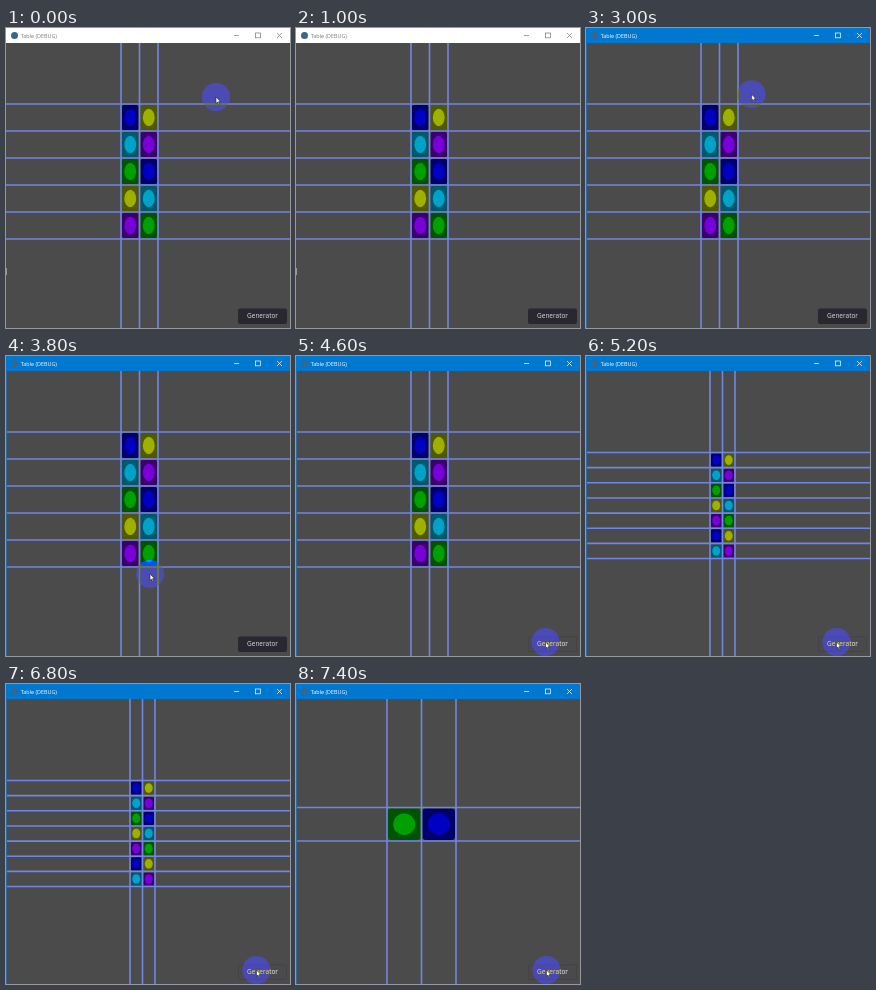
Write an HTML page with a canvas that moves like this. It is 284x300 px and loops after 8 s.

```html
<!DOCTYPE html>
<html lang="en">
<head>
<meta charset="utf-8">
<title>Table</title>
<style>
  html, body { margin: 0; width: 100%; height: 100%; overflow: hidden; background: #4b4b4b; }
  canvas { display: block; width: 100vw; height: 100vh; }
</style>
</head>
<body>
<canvas></canvas>
<script>
const WIDTH = 284, HEIGHT = 300, LOOP = 8000, STEP = 200;
const canvas = document.querySelector('canvas');
const ctx = canvas.getContext('2d');

// Tile colours in dealing order: background, disc
const PALETTE = [
  ['#000068', '#0000c4'],
  ['#505800', '#a0b000'],
  ['#00586c', '#00a2c8'],
  ['#3a006c', '#7800d8'],
  ['#005400', '#00a000'],
];

const GRIDS = [
  { from: 0, x: 115, y: 76, w: 18.5, h: 27, rows: 5, first: 0 },
  { from: 5200, x: 124, y: 96.5, w: 12.5, h: 15.15, rows: 7, first: 0 },
  { from: 7000, x: 91, y: 123.5, w: 34.5, h: 33.5, rows: 1, first: 4 },
];

// Pointer path: time, x, y
const PATH = [
  [0, 210, 69], [1000, 196, -30], [2000, 180, -30], [2400, 173, 13], [2600, 173, 13],
  [3800, 144, 218], [4600, 249.5, 286], [4800, 250.5, 286], [LOOP, 250.5, 286],
];

const BUTTON = { x: 232, y: 280.5, w: 49, h: 15.5 };

function pointerAt(t) {
  const i = PATH.findIndex(p => p[0] > t);
  const [t0, x0, y0] = PATH[i - 1], [t1, x1, y1] = PATH[i];
  const u = (t - t0) / (t1 - t0), k = u * u * (3 - 2 * u);
  return { x: x0 + (x1 - x0) * k, y: y0 + (y1 - y0) * k };
}

function rect(x, y, w, h, color) {
  ctx.fillStyle = color;
  ctx.fillRect(x, y, w, h);
}

function roundRect(x, y, w, h, r, color) {
  ctx.fillStyle = color;
  ctx.beginPath();
  ctx.roundRect(x, y, w, h, r);
  ctx.fill();
}

function ellipse(x, y, rx, ry, color) {
  ctx.fillStyle = color;
  ctx.beginPath();
  ctx.ellipse(x, y, rx, ry, 0, 0, Math.PI * 2);
  ctx.fill();
}

function line(x0, y0, x1, y1) {
  ctx.beginPath();
  ctx.moveTo(x0, y0);
  ctx.lineTo(x1, y1);
  ctx.stroke();
}

function text(label, x, y, size, color) {
  ctx.font = `${size}px "Open Sans", "Noto Sans", sans-serif`;
  ctx.fillStyle = color;
  ctx.fillText(label, x, y);
}

function drawGrid({ x, y, w, h, rows, first }) {
  for (let i = 0; i < rows * 2; i++) {
    const [back, disc] = PALETTE[(first + i) % PALETTE.length];
    const cx = x + w * (i % 2 + 0.5), cy = y + h * (Math.floor(i / 2) + 0.5);
    roundRect(cx - w / 2 + 1, cy - h / 2 + 1, w - 2, h - 2, w * 0.1, back);
    ellipse(cx, cy, w * 0.32, h * 0.32, disc);
  }
  ctx.strokeStyle = '#7186e4';
  ctx.lineWidth = 1.6;
  for (let c = 0; c <= 2; c++) line(x + c * w, 15, x + c * w, HEIGHT);
  for (let r = 0; r <= rows; r++) line(0, y + r * h, WIDTH, y + r * h);
}

function drawTitleBar(active) {
  const ink = active ? '#fff' : '#777';
  rect(0, 0, WIDTH, 15, active ? '#0078d0' : '#fff');
  ellipse(8.5, 7.5, 3.5, 3.5, '#35688c');
  text('Table (DEBUG)', 14.8, 9.6, 5.4, ink);
  ctx.strokeStyle = ink;
  ctx.lineWidth = 0.7;
  line(228, 7.5, 233, 7.5);
  ctx.strokeRect(249.6, 5, 4.8, 4.8);
  line(271, 5, 276, 10);
  line(276, 5, 271, 10);
  if (active) rect(0, 15, 1, HEIGHT, '#2a6ca8');
  else rect(0, 240, 0.8, 7, '#aaa');
}

function drawButton(hover) {
  const { x, y, w, h } = BUTTON;
  roundRect(x, y, w, h, 2, hover ? '#434247' : '#29272f');
  if (hover) roundRect(x + 0.7, y + 0.7, w - 1.4, h - 1.4, 1.5, '#4a494c');
  text('Generator', 241, 290.2, 6.5, hover ? '#f2f2f2' : '#dcdcdc');
}

function drawPointer({ x, y }, pressed) {
  // The halo inverts only the blue channel beneath it
  ctx.globalCompositeOperation = 'difference';
  ellipse(x, y, 14, 14, '#00f');
  ctx.globalCompositeOperation = 'source-over';
  if (pressed) {
    ctx.strokeStyle = '#e02010';
    ctx.lineWidth = 1.6;
    ctx.beginPath();
    ctx.arc(x, y, 3, 0, Math.PI * 2);
    ctx.stroke();
  }
  ctx.save();
  ctx.translate(x, y);
  ctx.beginPath();
  for (const [px, py] of [[0, 0], [0, 6.4], [1.5, 5.1], [2.5, 7.4], [3.5, 7], [2.5, 4.7], [4.5, 4.6]]) ctx.lineTo(px, py);
  ctx.closePath();
  ctx.strokeStyle = '#222';
  ctx.lineWidth = 0.6;
  ctx.fillStyle = '#fff';
  ctx.fill();
  ctx.stroke();
  ctx.restore();
}

function draw(t) {
  const pointer = pointerAt(t);
  const hover = pointer.x > BUTTON.x && pointer.y > BUTTON.y;
  rect(0, 0, WIDTH, HEIGHT, '#4b4b4b');
  drawGrid(GRIDS.findLast(grid => t >= grid.from));
  drawTitleBar(t >= 2600);
  drawButton(hover);
  drawPointer(pointer, t >= 2400 && t < 2600);
}

function resize() {
  canvas.width = Math.round(innerWidth * devicePixelRatio);
  canvas.height = Math.round(innerHeight * devicePixelRatio);
}

const start = performance.now();
function tick() {
  const t = (performance.now() - start) % LOOP;
  ctx.setTransform(canvas.width / WIDTH, 0, 0, canvas.height / HEIGHT, 0, 0);
  draw(Math.floor(t / STEP) * STEP);
  requestAnimationFrame(tick);
}

addEventListener('resize', resize);
resize();
tick();
</script>
</body>
</html>
```
